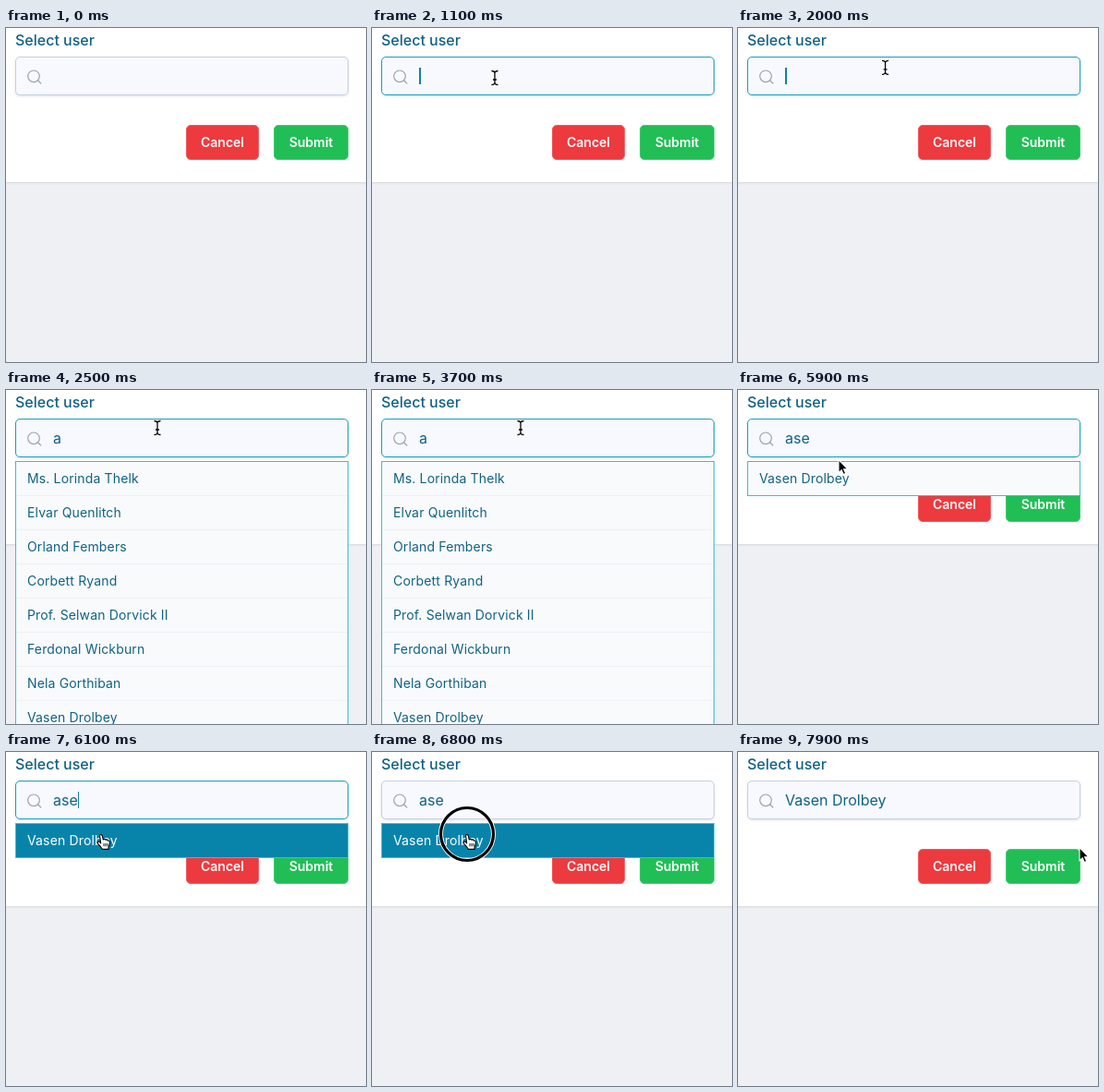
Recreate the animation shown at these times as an HTML page. Size 390x362 px, loop 8 s.

```html
<!DOCTYPE html>
<html lang="en">
<head>
<meta charset="utf-8">
<title>User picker</title>
<style>
  * { box-sizing: border-box; }
  html, body { margin: 0; width: 100%; height: 100%; overflow: hidden; }
  body { position: relative; background: #eff0f4; color: #0f6283; font: 400 16px Inter, sans-serif; }
  body > *, .field > * { position: absolute; }
  .card { left: 0; top: 0; width: 100%; height: 168px; background: #fff; border-bottom: 1px solid #dcdee3; box-shadow: 0 1px 2px #0000000d; }
  .label { left: 10px; top: 1px; line-height: 24px; font-weight: 500; }
  .field { left: 10px; top: 31px; width: 361px; height: 42px; border: 1px solid #c5d0e6; border-radius: 5px; background: #f7f9fe; box-shadow: 0 1px 3px #0000001f; }
  .field.focus { border-color: #16a2bb; }
  .field svg { left: 12px; top: 13px; fill: none; stroke: #9ba5b0; stroke-width: 1.2; stroke-linecap: round; }
  .value { left: 40px; top: 0; line-height: 41px; white-space: pre; }
  .caret { display: inline-block; width: 1.5px; height: 18px; margin-right: -2px; vertical-align: -3px; background: #17809c; }
  .button { top: 105px; height: 38px; border: 1px solid; border-radius: 5px; color: #fff; font-size: 14px; font-weight: 600; line-height: 36px; text-align: center; }
  .cancel { left: 195px; width: 79px; background: #ed3a3e; border-color: #f0595c; }
  .submit { left: 290px; width: 81px; background: #20be55; border-color: #43cb70; }
  .list { left: 10px; top: 77px; width: 361px; border: 1px solid #3bbdd0; background: #f9fafc; font-size: 14px; letter-spacing: .15px; }
  .row { height: 37px; padding-left: 12px; line-height: 36px; border-bottom: 1px solid #eef0f3; white-space: nowrap; }
  .row:last-child { height: 36px; border: 0; }
  .hover .row:first-child { background: #0884ab; color: #fff; }
  .pointer { left: 0; top: 0; width: 1px; height: 1px; overflow: visible; }
  [hidden] { display: none !important; }
</style>
</head>
<body>
<div class="card"></div>
<div class="label">Select user</div>
<div class="field">
  <svg width="16" height="16"><circle cx="7" cy="7.3" r="6.3"/><path d="M11.5 11.8L14.8 15"/></svg>
  <div class="value"><span class="text"></span><span class="caret"></span></div>
</div>
<div class="button cancel">Cancel</div>
<div class="button submit">Submit</div>
<div class="list"></div>
<svg class="pointer">
  <g class="ring" fill="none"><circle r="28.5" stroke="#fff" stroke-width="5"/><circle r="28.5" stroke="#000" stroke-width="3.2"/></g>
  <g class="beam" fill="none">
    <path d="M-3.5-7.5Q0-7.5 0-5V5Q0 7.5-3.5 7.5M3.5-7.5Q0-7.5 0-5M3.5 7.5Q0 7.5 0 5M-2 2H2" stroke="#fff" stroke-width="2.6"/>
    <path d="M-3.5-7.5Q0-7.5 0-5V5Q0 7.5-3.5 7.5M3.5-7.5Q0-7.5 0-5M3.5 7.5Q0 7.5 0 5M-2 2H2" stroke="#000" stroke-width="1.3"/>
  </g>
  <path class="arrow" d="M0-.5V13.7L3.2 10.7L5.3 15.6L7.7 14.6L5.6 9.8H10Z" fill="#000" stroke="#fff" stroke-width="1.1"/>
  <g class="hand" fill="#fff" stroke="#000" stroke-width="1.1" stroke-linejoin="round">
    <path d="M-1.4 2Q-1.6.6-.2.6T1.4 2L2.2 6Q4 4.8 4.8 6.3Q6.6 5.5 7.2 7.1Q9.4 6.7 9.5 8.8Q9.7 12 8 14V16.4H1.4Q0 13.7-3.6 10.1Q-4.5 8.7-3.2 8.2T-.3 9.8Z"/>
    <path d="M3 10V13.3M5 10V13.3M7 10V13.3" stroke-width=".9"/>
  </g>
</svg>
<script>
const LOOP = 8000, STEP = 100;
const names = ['Ms. Lorinda Thelk', 'Elvar Quenlitch', 'Orland Fembers', 'Corbett Ryand',
  'Prof. Selwan Dorvick II', 'Ferdonal Wickburn', 'Nela Gorthiban', 'Vasen Drolbey', 'Belon Tumas'];
const chosen = names[7];

// [start time, value]
const typed = [[0, ''], [2400, 'a'], [4200, 'as'], [5600, 'ase'], [6900, chosen]];
const queries = [[0, ''], [2500, 'a'], [4300, 'as'], [5700, 'ase'], [6900, '']];
const caretSpans = [[1000, 1500], [2000, 2400], [2900, 3400], [3900, 4200], [4700, 5100], [6100, 6600]];
const ringSpans = [[900, 1000], [6600, 6900]];
// [time, x, y]
const path = [[600, 180, 100], [800, 140, 58], [900, 133, 54], [1400, 133, 54], [2100, 164, 41],
  [3200, 164, 41], [3700, 161, 41], [5600, 161, 41], [5900, 109, 76], [6000, 104, 86],
  [6100, 103, 89], [7600, 103, 89], [7700, 150, 91], [7800, 280, 99], [7900, 370, 104]];

const $ = name => document.querySelector('.' + name);
const field = $('field'), text = $('text'), caret = $('caret'), list = $('list'), pointer = $('pointer');
const shapes = ['beam', 'arrow', 'hand'].map($), ring = $('ring');

const valueAt = (track, t) => track.findLast(([start]) => t >= start)[1];
const within = (spans, t) => spans.some(([from, to]) => t >= from && t < to);
const show = (el, on) => { el.style.display = on ? '' : 'none'; };

function pointAt(t) {
  const i = path.findLastIndex(p => t >= p[0]);
  if (i < 0) return null;
  const a = path[i], b = path[i + 1] || a;
  const k = b === a ? 0 : (t - a[0]) / (b[0] - a[0]);
  return [a[1] + (b[1] - a[1]) * k, a[2] + (b[2] - a[2]) * k];
}

let lastQuery;
function fillList(query) {
  if (query === lastQuery) return;
  lastQuery = query;
  const matches = query ? names.filter(name => name.includes(query)) : [];
  list.innerHTML = matches.map(name => `<div class="row">${name}</div>`).join('');
  list.hidden = !matches.length;
}

function render(t) {
  const query = valueAt(queries, t), point = pointAt(t);
  text.textContent = valueAt(typed, t);
  field.classList.toggle('focus', t >= 900 && t < 6600);
  show(caret, within(caretSpans, t));
  fillList(query);
  show(pointer, point);
  if (!point) return list.classList.remove('hover');

  const [x, y] = point, overList = query !== '' && y > 77;
  const kind = overList ? 'hand' : y < 73 ? 'beam' : 'arrow';
  list.classList.toggle('hover', overList);
  pointer.style.transform = `translate(${x}px, ${y}px)`;
  shapes.forEach(shape => show(shape, shape.classList.contains(kind)));
  show(ring, within(ringSpans, t));
}

const begin = performance.now();
function tick() {
  const t = (performance.now() - begin) % LOOP;
  render(Math.floor(t / STEP) * STEP);
  requestAnimationFrame(tick);
}
tick();
</script>
</body>
</html>
```
